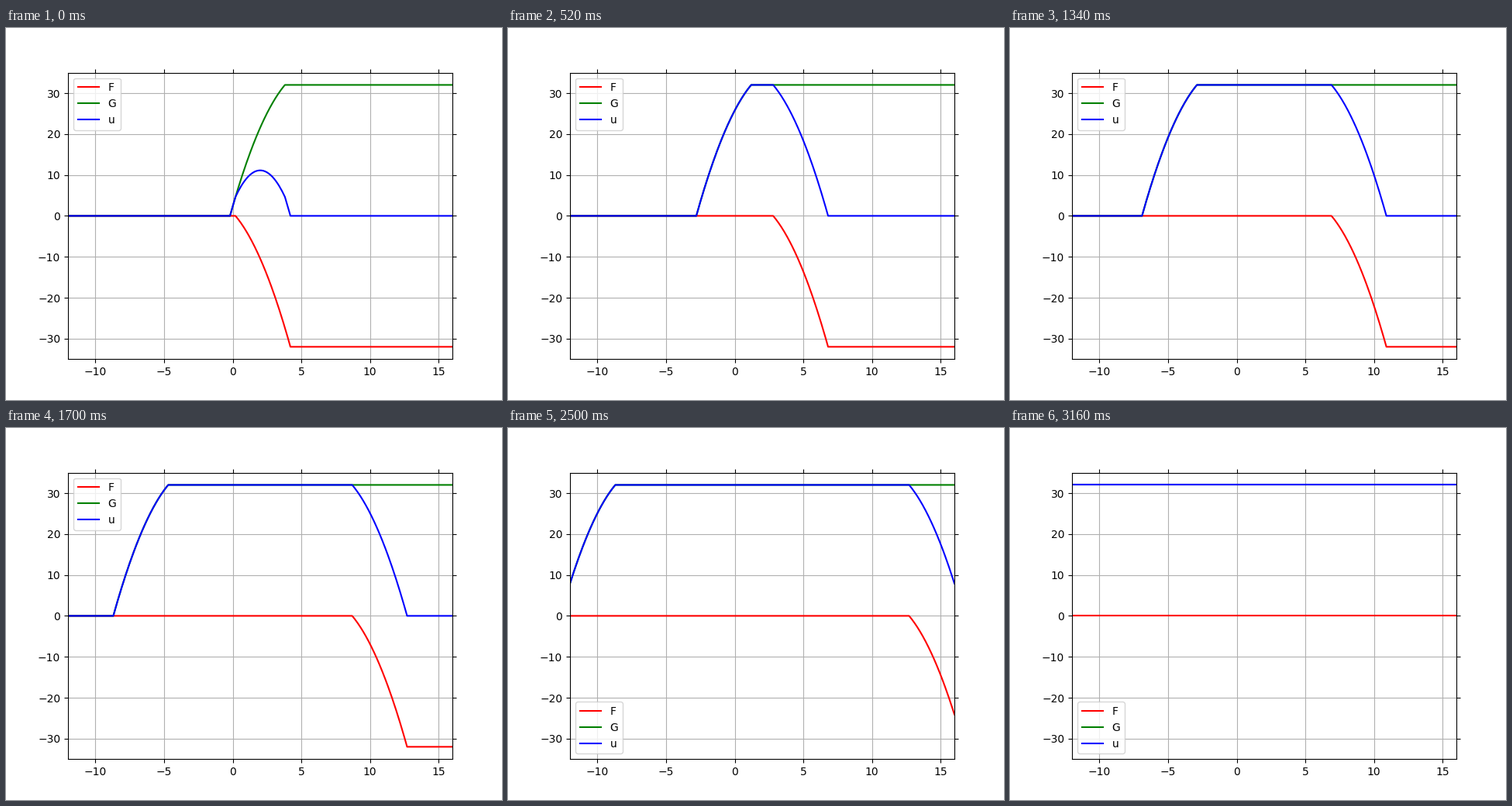
A matplotlib script that plays this animation: 640 by 480 pixels, repeating every 3.96 s.

```python
import numpy as np
import matplotlib.pyplot as plt
from matplotlib.animation import FuncAnimation

FRAMES = 198
INTERVAL = 20
START, END, STEP = 0.2, 16.0, 0.1  # travelled distance of the two waves

x = np.linspace(-12, 16, 281)


def right_wave(s):
    z = np.clip(x - s, 0, 4)
    return -z * (z + 4)


def left_wave(s):
    z = np.clip(x + s, 0, 4)
    return z * (12 - z)


fig, ax = plt.subplots(figsize=(6.4, 4.8), dpi=100)
ax.set_xlim(-12, 16)
ax.set_ylim(-35, 35)
ax.tick_params(top=True, right=True)
ax.grid(True)

line_f, = ax.plot(x, right_wave(START), color="red", label="F")
line_g, = ax.plot(x, left_wave(START), color="green", label="G")
line_u, = ax.plot(x, right_wave(START) + left_wave(START), color="blue", label="u")
ax.legend(loc="best")


def update(i):
    s = min(START + STEP * i, END)
    f, g = right_wave(s), left_wave(s)
    line_f.set_ydata(f)
    line_g.set_ydata(g)
    line_u.set_ydata(f + g)
    return line_f, line_g, line_u


anim = FuncAnimation(fig, update, frames=FRAMES, interval=INTERVAL,
                     repeat=True, repeat_delay=0, blit=False)
plt.show()
```
